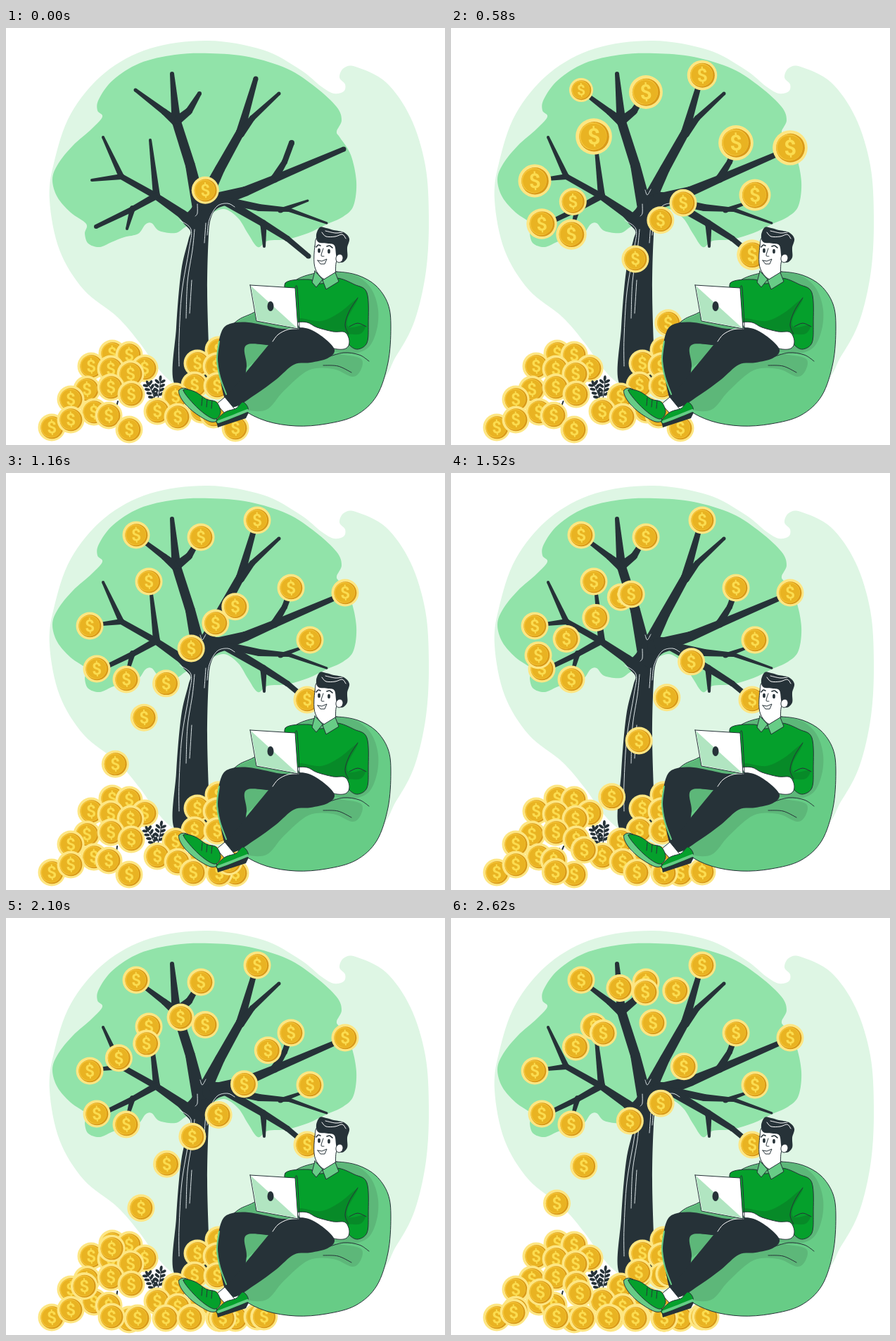
An HTML page with a canvas for the animation above (2640 ms loop, 624 by 592 pixels).

```html
<!DOCTYPE html>
<html lang="en">
<head>
<meta charset="utf-8">
<title>Money tree</title>
<style>
html, body { margin: 0; width: 100%; height: 100%; overflow: hidden; background: #fff; }
canvas { display: block; }
</style>
</head>
<body>
<canvas id="stage" width="624" height="592"></canvas>
<script>
const ctx = document.getElementById('stage').getContext('2d');
const LOOP = 2640, COIN = 19.5, HALF_GRAVITY = 325;
const INK = '#263238', GREEN = '#05a02c', DEEP = '#078a28', LIME = '#67cc86', SHADE = '#5db779';

// Path through flat [x, y, ...] points: smooth or straight, open or closed.
function trace(p, smooth, closed) {
  const n = p.length / 2;
  const at = i => {
    const k = closed ? (i + n) % n : Math.max(0, Math.min(n - 1, i));
    return [p[2 * k], p[2 * k + 1]];
  };
  ctx.beginPath();
  ctx.moveTo(p[0], p[1]);
  for (let i = 0; i < (closed ? n : n - 1); i++) {
    const [a, b, c, d] = [at(i - 1), at(i), at(i + 1), at(i + 2)];
    if (smooth) {
      ctx.bezierCurveTo(b[0] + (c[0] - a[0]) / 6, b[1] + (c[1] - a[1]) / 6,
        c[0] - (d[0] - b[0]) / 6, c[1] - (d[1] - b[1]) / 6, c[0], c[1]);
    } else ctx.lineTo(c[0], c[1]);
  }
  if (closed) ctx.closePath();
}
function paint(fill, outline) {
  ctx.fillStyle = fill;
  ctx.fill();
  if (outline) { ctx.strokeStyle = INK; ctx.lineWidth = 1; ctx.stroke(); }
}
function blob(fill, p, outline) { trace(p, true, true); paint(fill, outline); }
function poly(fill, p, outline) { trace(p, false, true); paint(fill, outline); }
function line(color, p, width = 1) {
  trace(p, true, false);
  ctx.strokeStyle = color;
  ctx.lineWidth = width;
  ctx.lineCap = ctx.lineJoin = 'round';
  ctx.stroke();
}
function oval(fill, x, y, rx, ry = rx, turn = 0, outline = false) {
  ctx.beginPath();
  ctx.ellipse(x, y, rx, ry, turn, 0, 7);
  paint(fill, outline);
}

// Tapered branch through nodes of [x, y, thickness].
function limb(...nodes) {
  nodes.forEach(([x, y, w], i) => {
    oval(INK, x, y, w / 2);
    if (!i) return;
    const [px, py, pw] = nodes[i - 1];
    const a = Math.atan2(y - py, x - px) + Math.PI / 2;
    const c = Math.cos(a) / 2, s = Math.sin(a) / 2;
    poly(INK, [px + c * pw, py + s * pw, x + c * w, y + s * w,
      x - c * w, y - s * w, px - c * pw, py - s * pw]);
  });
}

function coin(x, y, r = COIN) {
  if (r < 0.5) return;
  ctx.save();
  ctx.translate(x, y);
  ctx.scale(r / COIN, r / COIN);
  oval('#fde683', 0, 0, COIN);
  oval('#d99a19', 0.4, 0.2, 16);
  oval('#f5c53a', -0.8, -0.3, 14.8);
  oval('#e9b322', -0.2, 0, 13.8);
  ctx.fillStyle = '#fbdc50';
  ctx.font = 'bold 24px Roboto, Arial, sans-serif';
  ctx.textAlign = 'center';
  ctx.textBaseline = 'alphabetic';
  ctx.rotate(-0.07);
  ctx.fillText('$', 0, 8.4);
  ctx.restore();
}

function backdrop() {
  ctx.fillStyle = '#fff';
  ctx.fillRect(0, 0, 624, 592);
  blob('#def6e4', [62, 245, 68, 192, 92, 122, 140, 64, 205, 29, 287, 18, 365, 31, 418, 59,
    448, 83, 466, 93, 480, 90, 482, 80, 474, 70, 480, 57, 497, 55, 540, 77, 575, 127, 596, 195,
    601, 270, 597, 345, 581, 415, 555, 465, 520, 510, 400, 540, 290, 532, 240, 506, 215, 482,
    190, 447, 158, 410, 110, 371, 76, 315]);
  blob('#91e3a9', [66, 215, 74, 193, 95, 167, 122, 143, 137, 126, 130, 117, 132, 101, 152, 74,
    190, 50, 240, 38, 290, 36, 345, 41, 400, 58, 440, 84, 470, 112, 477, 131, 470, 147, 475, 156,
    490, 180, 498, 218, 494, 252, 479, 268, 455, 279, 430, 291, 400, 300, 372, 302, 358, 311,
    344, 292, 330, 270, 310, 257, 288, 265, 256, 282, 241, 291, 218, 288, 207, 277, 198, 279,
    188, 292, 168, 297, 150, 304, 133, 311, 117, 306, 112, 292, 114, 278, 92, 262, 73, 240]);
}

function tree() {
  blob(INK, [240, 506, 242, 425, 249, 345, 259, 302, 262, 288, 250, 272, 264, 255, 272, 235,
    300, 233, 322, 241, 335, 250, 318, 251, 301, 256, 292, 268, 288, 295, 286, 370, 288, 450, 290, 506]);
  limb([272, 283, 20], [250, 264, 13], [212, 238, 9], [164, 211, 8], [138, 155, 4]);
  limb([164, 211, 8], [122, 216, 4]);
  limb([214, 238, 10], [205, 159, 4]);
  limb([214, 238, 10], [180, 257, 8], [128, 282, 6]);
  limb([180, 256, 8], [172, 285, 4]);
  limb([274, 250, 20], [262, 195, 14], [242, 132, 13], [236, 65, 6]);
  limb([242, 133, 13], [225, 119, 9], [184, 88, 5]);
  limb([245, 130, 12], [260, 118, 10], [275, 93, 6]);
  limb([280, 248, 20], [304, 200, 14], [333, 148, 12], [355, 72, 7]);
  limb([333, 150, 12], [350, 128, 8], [388, 93, 5]);
  limb([290, 247, 22], [340, 232, 14], [382, 214, 11], [480, 172, 7]);
  limb([382, 213, 11], [396, 190, 8], [406, 163, 8]);
  limb([318, 246, 10], [360, 255, 10], [402, 258, 6], [456, 277, 3]);
  limb([390, 259, 7], [429, 245, 3]);
  limb([312, 246, 12], [365, 277, 10], [400, 299, 8], [430, 324, 7]);
  limb([366, 280, 9], [367, 310, 4]);
  const bark = '#dbe4e6';
  line(bark, [276, 230, 279, 237, 284, 229]);
  line(bark, [272, 250, 272, 263, 269, 267]);
  line(bark, [247, 273, 263, 286, 260, 315, 250, 375, 246, 440, 246, 480]);
  line(bark, [268, 286, 265, 315, 258, 360, 256, 412]);
  line(bark, [264, 358, 261, 405]);
  line(bark, [286, 294, 289, 272, 300, 253, 315, 249, 325, 254]);
  line(bark, [284, 277, 282, 305]);
}

function sprig(x, y, height, lean) {
  ctx.save();
  ctx.translate(x, y);
  ctx.rotate(lean);
  line(INK, [0, 0, 1, -height / 2, 0, -height], 1.3);
  for (let h = 5; h < height; h += 6) {
    oval(INK, -4, -h - 1, 4, 2, 0.6);
    oval(INK, 4, -h - 2, 4, 2, -0.6);
  }
  oval(INK, 0, -height, 2, 4);
  ctx.restore();
}
function plants(t) {
  const sway = 0.07 * Math.sin(t / LOOP * Math.PI * 4);
  sprig(212, 528, 26, -0.42 + sway);
  sprig(216, 526, 29, 0.12 - sway);
  line(INK, [153, 539, 153 + sway * 20, 533], 2);
  line(INK, [157, 537, 159 + sway * 20, 530], 2);
}

const pileBack = [[151, 462], [175, 464], [121, 480], [197, 483], [149, 484], [177, 491], [115, 513],
  [149, 510], [178, 520], [92, 527], [302, 457], [272, 476], [299, 480], [268, 507], [300, 508]];
const pileFront = [[65, 567], [125, 545], [92, 556], [146, 550], [175, 570], [241, 523], [278, 542],
  [215, 544], [244, 552], [295, 549], [326, 568]];

// x, y, pop start
const treeCoins = [[357, 67, 20], [129, 278, 40], [428, 322, 40], [432, 237, 70], [119, 217, 110],
  [482, 170, 170], [203, 154, 240], [405, 163, 320], [277, 91, 335], [171, 293, 360], [185, 88, 400]];

// start, x, y, drift, rest x, rest y
const settlingCoins = [
  [-210, 274, 216, 44, 303, 568], [48, 255, 236, 13, 264, 567], [130, 283, 207, 33, 303, 568],
  [270, 316, 217, 45, 357, 566],
  [428, 178, 239, -31, 150, 566], [537, 208, 221, -19, 187, 568], [652, 226, 215, 3, 227, 568],
  [780, 259, 202, 11, 262, 568], [888, 291, 189, 25, 303, 568], [1006, 319, 182, 44, 362, 566],
  [1110, 133, 204, -22, 89, 560], [1190, 172, 200, -24, 127, 531], [1263, 212, 184, -24, 183, 533],
  [1351, 245, 167, -22, 225, 567], [1443, 255, 170, 15, 266, 503], [1530, 285, 174, 30, 302, 505],
  [1650, 316, 170, 50, 357, 566], [1750, 346, 148, 75, 363, 566]];
const airborneCoins = [
  [1750, 167, 159, -19], [1845, 205, 157, -21], [1925, 246, 131, 12], [2030, 281, 150, 29],
  [2150, 310, 139, 45], [2240, 185, 136, -20], [2300, 222, 130, -18], [2270, 280, 109, 20],
  [2484, 276, 99, 0], [2510, 317, 99, 25], [2550, 241, 98, -15]];

function popRadius(age) {
  const peak = 26, rise = 300, fall = 400;
  if (age <= 0) return 0;
  if (age < rise) return peak * (1 - Math.cos(Math.PI * age / rise)) / 2;
  const k = Math.min(1, (age - rise) / fall);
  return peak + (COIN - peak) * (1 - Math.cos(Math.PI * k)) / 2;
}
function fallingCoin(t, [start, x, y, drift, restX = x, restY = 567]) {
  const age = (t - start) / 1000;
  if (age < 0.06) return;
  const landing = Math.sqrt((restY - y) / HALF_GRAVITY);
  const air = Math.min(age, landing);
  const slide = Math.min(1, Math.max(0, (age - landing) / 0.2));
  const flyX = x + drift * air;
  coin(flyX + (restX - flyX) * slide, y + HALF_GRAVITY * air * air);
}

function beanbag() {
  blob(LIME, [470, 346, 500, 351, 526, 366, 543, 392, 547, 425, 543, 475, 527, 522, 497, 550,
    455, 562, 412, 565, 370, 558, 336, 541, 312, 515, 302, 480, 305, 442, 328, 416, 352, 404,
    385, 385, 410, 359, 440, 348], true);
  blob(SHADE, [470, 347, 498, 352, 519, 370, 529, 400, 526, 432, 512, 456, 480, 462, 420, 450,
    360, 470, 318, 500, 304, 480, 306, 442, 329, 417, 354, 405, 386, 385, 411, 360, 440, 349]);
  blob(SHADE, [452, 462, 480, 464, 505, 470, 504, 486, 492, 495, 465, 484, 430, 486, 395, 515,
    370, 542, 338, 540, 330, 520, 400, 475]);
  line(INK, [455, 468, 480, 461, 502, 464, 516, 473]);
  line(INK, [451, 479, 472, 480, 491, 489]);
}

function head() {
  blob('#fff', [439, 310, 444, 296, 470, 294, 483, 306, 482, 324, 470, 331, 467, 351, 454, 357,
    443, 348, 438, 334], true);
  blob(INK, [444, 304, 441, 294, 446, 283, 455, 284, 466, 287, 480, 290, 488, 299, 485, 312,
    485, 326, 477, 333, 470, 326, 467, 309, 458, 306]);
  oval('#fff', 474, 327, 5, 6, 0.3, true);
  line('#fff', [449, 290, 455, 296, 468, 296, 478, 293, 483, 299]);
  line('#fff', [454, 288, 468, 291, 478, 290]);
  oval(INK, 445, 316, 1.9, 3.2);
  oval(INK, 459, 317, 1.9, 3.2);
  line(INK, [441, 311, 444, 308, 447, 309], 1.6);
  line(INK, [456, 310, 460, 309, 464, 312], 1.6);
  line(INK, [451, 313, 448, 323, 452, 324]);
  poly('#fff', [443, 330, 449, 331, 456, 328, 453, 335, 447, 335], true);
}

function body() {
  blob(GREEN, [397, 362, 430, 357, 448, 363, 470, 355, 495, 364, 513, 376, 515, 420, 513, 447,
    500, 456, 488, 450, 478, 434, 450, 429, 415, 421, 404, 390], true);
  blob(DEEP, [418, 412, 448, 416, 474, 404, 500, 384, 486, 412, 488, 425, 510, 422, 504, 434,
    484, 434, 450, 428, 420, 421]);
  line(INK, [500, 383, 488, 402, 482, 421, 487, 435]);
  line(INK, [488, 424, 500, 419, 512, 424]);
  head();
  poly(LIME, [439, 345, 435, 361, 441, 368, 450, 357], true);
  poly(LIME, [450, 358, 455, 371, 473, 360, 468, 347], true);
  blob('#fff', [413, 419, 428, 418, 442, 425, 465, 431, 482, 432, 488, 445, 483, 455, 466, 455,
    445, 445, 425, 432], true);
}

function legs() {
  blob(INK, [306, 432, 318, 420, 345, 418, 385, 426, 405, 430, 388, 450, 342, 450, 342, 480,
    336, 510, 324, 532, 312, 528, 305, 500, 301, 462]);
  blob(INK, [374, 449, 388, 433, 410, 426, 430, 427, 452, 440, 467, 457, 457, 469, 433, 475,
    409, 478, 384, 499, 355, 520, 325, 538, 313, 528, 338, 493, 355, 472]);
  line('#fff', [379, 445, 387, 435, 401, 428, 416, 427]);
  line(LIME, [303, 445, 300, 470, 304, 495, 313, 520], 2);
}

function laptop() {
  poly('#fff', [347, 365, 411, 369, 415, 427, 356, 416], true);
  poly('#b1e5c1', [348, 366, 414, 426, 357, 415]);
  line(INK, [411, 369, 414, 370, 417, 425, 415, 427]);
  oval(INK, 376, 395, 4.5, 7);
}

function shoes() {
  poly('#fff', [299, 534, 311, 524, 325, 541, 312, 548], true);
  blob(LIME, [246, 514, 262, 515, 298, 552, 291, 559, 268, 546, 251, 529], true);
  blob(GREEN, [252, 514, 268, 516, 285, 527, 299, 531, 305, 545, 298, 555, 284, 549, 266, 533], true);
  for (let i = 0; i < 3; i++) line(INK, [279 + i * 7, 525 + i * 2, 278 + i * 7, 536 + i * 2]);
  poly(INK, [299, 558, 340, 543, 345, 546, 341, 554, 301, 567]);
  blob(GREEN, [300, 556, 312, 545, 327, 540, 337, 531, 344, 543, 325, 553, 302, 561], true);
  line(LIME, [302, 559, 323, 551, 343, 543], 4);
}

function draw(t) {
  backdrop();
  tree();
  for (const [x, y, start] of treeCoins) coin(x, y, popRadius(t - start));
  pileBack.forEach(p => coin(...p));
  plants(t);
  pileFront.forEach(p => coin(...p));
  for (const c of settlingCoins) fallingCoin(t, c);
  for (const c of airborneCoins) fallingCoin(t, c);
  beanbag();
  body();
  legs();
  laptop();
  shoes();
}

let begin;
function tick(now) {
  begin ??= now;
  draw(Math.floor((now - begin) % LOOP / 20) * 20);
  requestAnimationFrame(tick);
}
draw(0);
requestAnimationFrame(tick);
</script>
</body>
</html>
```
